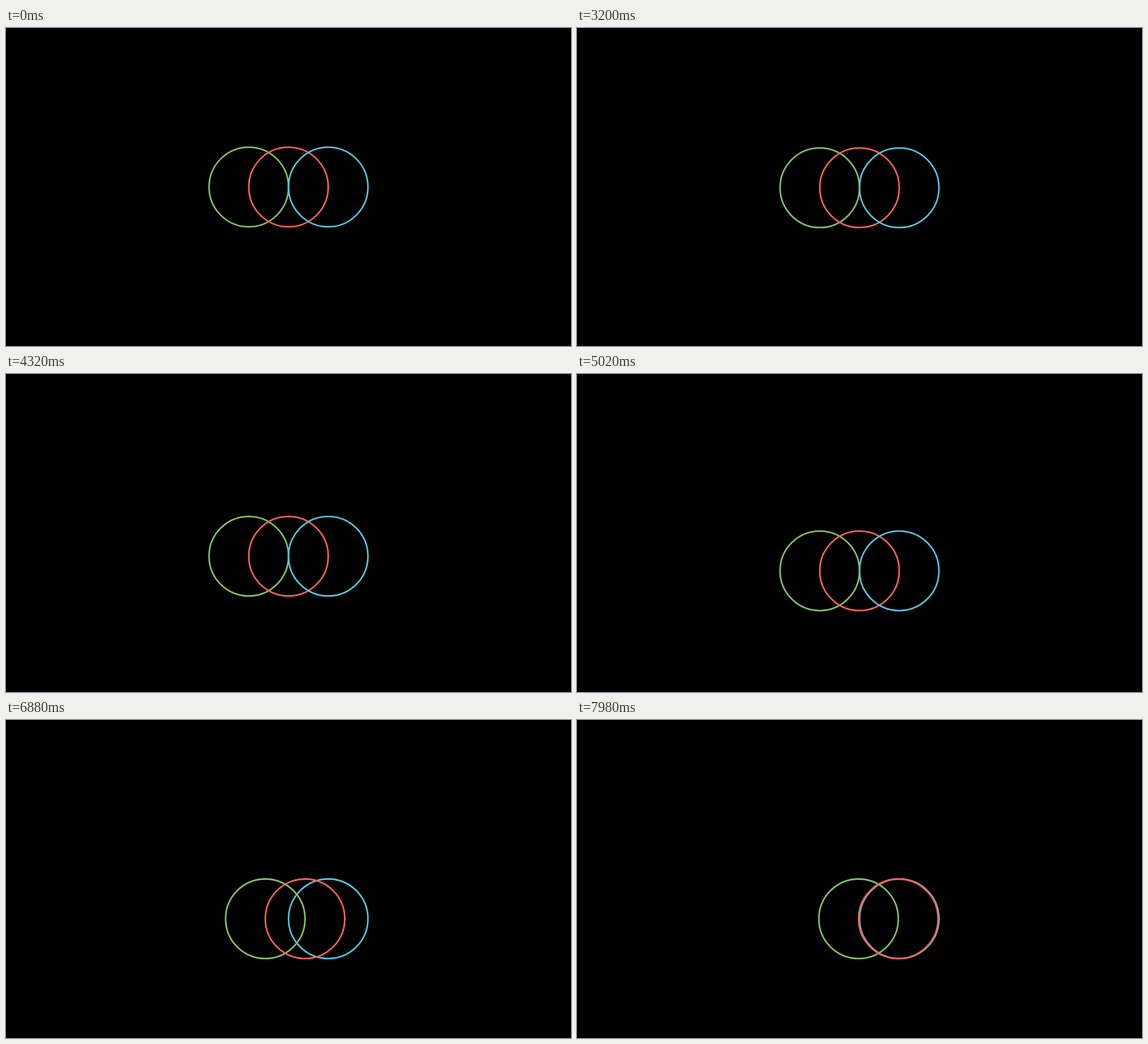
Recreate the animation shown at these times as an HTML page. Size 998 px wide and 561 px high, loop 8000 ms.

```html
<!DOCTYPE html>
<html lang="en">
<head>
<meta charset="utf-8">
<title>Three circles</title>
<style>
  html, body { margin: 0; width: 100%; height: 100%; overflow: hidden; background: #000; }
  svg { display: block; width: 998px; height: 561px; }
  circle { fill: none; stroke-width: 2.8; }
</style>
</head>
<body>
<svg viewBox="0 0 998 561">
  <use id="under" href="#blue"/>
  <circle id="green" stroke="#83c167"/>
  <circle id="red" stroke="#fc6255"/>
  <circle id="blue" stroke="#58c4dd"/>
</svg>
<script>
const LOOP = 8000, UNIT = 70.17, CENTER_X = 499, CENTER_Y = 280.5;
const MOVE_STEPS = 60, DOWN_START = 61, RIGHT_START = 121;

const svg = document.querySelector("svg");
const [green, red, blue] = ["green", "red", "blue"].map(id => document.getElementById(id));
document.getElementById("under").remove();

// Steps come in groups of three, held for 20, 20 and 100 ms.
function stepAt(ms) {
  const shifted = ms + 20, rest = shifted % 140;
  return 3 * Math.floor(shifted / 140) + (rest < 20 ? 0 : rest < 40 ? 1 : 2);
}

const sigmoid = x => 1 / (1 + Math.exp(-x));

// Sigmoid easing, normalised to run from 0 to 1.
function progress(step, start) {
  const t = Math.min(1, Math.max(0, (step - start) / MOVE_STEPS));
  const edge = sigmoid(-5);
  return (sigmoid(10 * (t - 0.5)) - edge) / (1 - 2 * edge);
}

function place(circle, x, y) {
  circle.setAttribute("cx", CENTER_X + x * UNIT);
  circle.setAttribute("cy", CENTER_Y + y * UNIT);
  circle.setAttribute("r", UNIT);
}

let blueBehind = false;
function setBlueBehind(behind) {
  if (behind === blueBehind) return;
  blueBehind = behind;
  svg.insertBefore(blue, behind ? green : null);
}

function draw() {
  const step = stepAt(performance.now() % LOOP);
  const down = progress(step, DOWN_START);
  const right = progress(step, RIGHT_START);
  place(green, right - 1, down);
  place(red, right, down);
  place(blue, 1, down);
  setBlueBehind(step >= RIGHT_START);
  requestAnimationFrame(draw);
}
draw();
</script>
</body>
</html>
```
